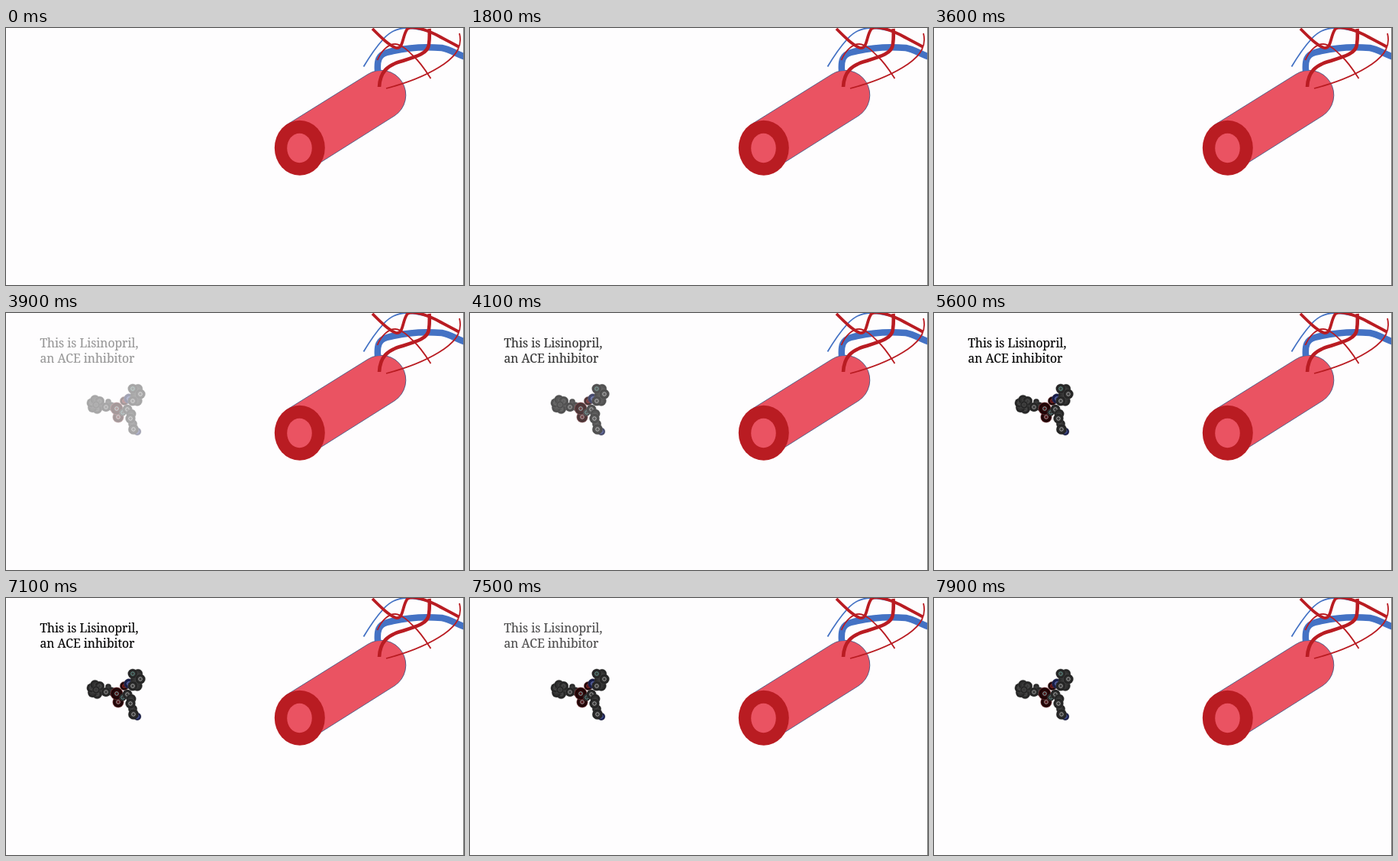
Write an HTML page that moves like this. It is 600 px wide and 336 px high and loops after 8 s.

```html
<!DOCTYPE html>
<html lang="en">
<head>
<meta charset="utf-8">
<style>
  html, body { margin: 0; width: 100%; height: 100%; overflow: hidden; background: #fefdfe; }
  svg { display: block; width: 600px; height: 336px; }
  text { font: 15.7px "Noto Serif", serif; fill: #000; stroke: #000; stroke-width: .15px; }
  .vessels path { fill: none; }
  .red { stroke: #b91c22; }
  .blue { stroke: #4472c4; }
</style>
</head>
<body>
<svg viewBox="0 0 600 336">
  <defs>
    <radialGradient id="carbon"><stop stop-color="#3c3c3c"/><stop offset=".6" stop-color="#2b2b2b"/><stop offset="1" stop-color="#1a1a1a"/></radialGradient>
    <radialGradient id="oxygen"><stop stop-color="#5c1318"/><stop offset=".5" stop-color="#2a0709"/><stop offset=".8" stop-color="#180506"/><stop offset="1" stop-color="#6a1016"/></radialGradient>
    <radialGradient id="nitrogen"><stop stop-color="#343f88"/><stop offset=".6" stop-color="#1a2048"/><stop offset="1" stop-color="#14174a"/></radialGradient>
  </defs>
  <path d="M367 127 L474 60.500 A32.300 32.300 0 0 1 509 114.800 L412 175.800 Z" fill="#ea5362" stroke="#34507f" stroke-width=".8"/>
  <ellipse cx="384.8" cy="156.8" rx="33" ry="36" fill="#b91c22"/>
  <ellipse cx="384.5" cy="157" rx="16.3" ry="19.3" fill="#ea5362"/>
  <g class="vessels">
    <path class="blue" stroke-width="1.800" d="M468.500 50.500 C476 38 484 26 493 16 C502 5 513 0 525 0 C533 0 539 1 546 3"/>
    <path class="blue" stroke-width="8.500" d="M487 56 C486 43 488 35 499 32 C521 26 548 24 571 26 C582 28 590 34 602 38"/>
    <path class="red" stroke-width="4.600" d="M489 77 C490 57 500 49 516 44 C536 38 553 34 554 21 C555 14 555 8 554.500 1"/>
    <path class="red" stroke-width="3.800" d="M480 1 C491 12 502 23 511 26 C521 28 519 9 526 1 C533 -4 552 3 563 8.500 C573 14 583 19 593 24.500"/>
    <path class="red" stroke-width="1.800" d="M486.500 42 C492 29 501 21 510 21 C519 22 526 29 534 37 C543 45 550 56 556.500 66"/>
    <path class="red" stroke-width="1.800" d="M498 79 C525 72 552 62 574 47 C591 35 598 23 594 7"/>
  </g>
  <path d="M599.500 0 V336" stroke="#777"/>
  <g id="molecule"></g>
  <g id="caption">
    <text x="44.500" y="44.700">This is Lisinopril,</text>
    <text x="44.500" y="65">an ACE inhibitor</text>
  </g>
</svg>
<script>
const LOOP = 8000;
const molecule = document.getElementById('molecule');
const caption = document.getElementById('caption');

function circle(cx, cy, r, style) {
  const el = document.createElementNS('http://www.w3.org/2000/svg', 'circle');
  const attrs = { cx, cy, r, ...style };
  for (const name in attrs) el.setAttribute(name, attrs[name]);
  molecule.append(el);
}

function ball(x, y, r, kind, glint) {
  circle(x, y, r, { fill: `url(#${kind})`, stroke: '#666', 'stroke-width': .35 });
  if (glint) circle(x, y, 2.3, { fill: 'none', stroke: glint, 'stroke-width': .8 });
}

function ring(cx, cy, radius, r, glint) {
  for (let i = 0; i < 6; i++) {
    const a = i * Math.PI / 3 + .3;
    ball(cx + radius * Math.cos(a), cy + radius * Math.sin(a), r, 'carbon', i % 2 ? glint : '');
  }
}

ring(118, 119.5, 6.3, 6.2, '#585858');
ball(118, 120, 5, 'carbon', '#505050');
for (const [x, y, r, kind, glint] of [
  [134, 116, 3.8, 'carbon', ''],
  [138, 122, 5.5, 'carbon', ''],
  [131, 123, 6, 'carbon', '#aaa'],
  [155, 115, 5.8, 'oxygen', '#a33'],
  [147, 136, 7.3, 'oxygen', '#bbb'],
  [145, 125, 8.2, 'oxygen', '#8cc'],
  [153, 130, 4.5, 'carbon', '#68a0a0'],
  [161, 112, 6.5, 'nitrogen', '#8090d0'],
  [159, 126, 6.3, 'carbon', '#bbb'],
  [164, 132, 6.3, 'carbon', ''],
  [166, 145, 5.8, 'carbon', ''],
  [163, 138, 6.5, 'carbon', '#bbb'],
  [172, 155, 5, 'nitrogen', '#5968b8'],
  [167, 152, 6.8, 'carbon', '#bbb'],
  [170, 107, 7, 'carbon', ''],
  [173, 99, 6, 'carbon', ''],
  [166, 99, 6.3, 'carbon', '#6aa89c'],
  [172, 115, 6.5, 'carbon', ''],
  [176, 106, 6.5, 'carbon', '#bbb'],
  [166, 115, 6.3, 'carbon', '#bbb']
]) ball(x, y, r, kind, glint);

const clamp = v => Math.max(0, Math.min(1, v));

// Ten steps a second, with every fifth one held over.
function stepTime(ms) {
  const k = Math.floor(ms / 100);
  return (k % 5 === 2 ? k - 1 : k) * 100;
}

function draw(ms) {
  const t = stepTime(ms % LOOP);
  const fadeIn = clamp((t - 3700) / 500);
  const fadeOut = clamp((7850 - t) / 500);
  molecule.setAttribute('opacity', fadeIn);
  caption.setAttribute('opacity', Math.min(fadeIn, fadeOut));
}

const start = performance.now();
function tick() {
  draw(performance.now() - start);
  requestAnimationFrame(tick);
}
draw(0);
requestAnimationFrame(tick);
</script>
</body>
</html>
```
